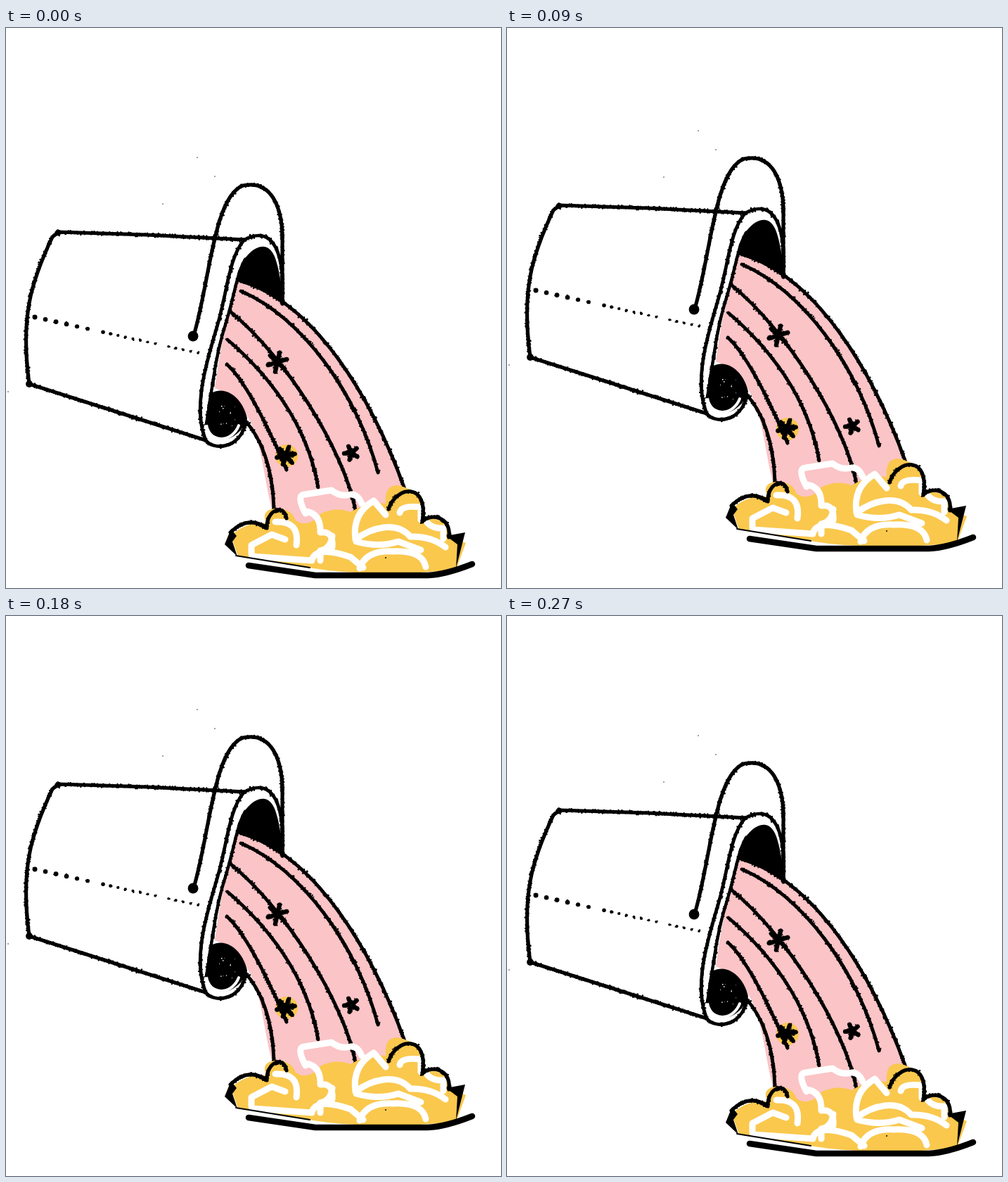
These frames come from a looping animation (704x796 px, 300 ms). An HTML page with a canvas:

```html
<!DOCTYPE html>
<html lang="en">
<head>
<meta charset="utf-8">
<title>Pouring bucket</title>
<style>
  html, body { margin: 0; width: 100%; height: 100%; overflow: hidden; background: #fff; }
  canvas { display: block; }
</style>
</head>
<body>
<canvas id="stage" width="704" height="796"></canvas>
<svg width="0" height="0"><path id="guide"/></svg>
<script>
const WIDTH = 704, HEIGHT = 796, STEP_MS = 30, STEPS = 10, PEAK_STEP = 5, PEAK = 63;
const INK = '#000', PAPER = '#fff', PINK = '#fbc4c6', YELLOW = '#fac84d';

const stage = document.getElementById('stage').getContext('2d');
const guide = document.getElementById('guide');
const art = document.createElement('canvas');
art.width = WIDTH;
art.height = HEIGHT;
const g = art.getContext('2d');

let seed = 17;
function random() {
  seed = (seed * 1664525 + 1013904223) % 4294967296;
  return seed / 4294967296;
}

function fill(path, color) {
  g.fillStyle = color;
  g.fill(new Path2D(path));
}

function line(path, color, width) {
  g.strokeStyle = color;
  g.lineWidth = width;
  g.stroke(new Path2D(path));
}

function dot(x, y, r, color = INK) {
  g.fillStyle = color;
  g.beginPath();
  g.arc(x, y, r, 0, Math.PI * 2);
  g.fill();
}

// Solid core with grainy edges.
function crayon(path, width = 6) {
  line(path, INK, width - 1.2);
  guide.setAttribute('d', path);
  const length = guide.getTotalLength(), spread = width - 0.8;
  for (let s = 0; s <= length; s += 0.8) {
    const { x, y } = guide.getPointAtLength(s);
    dot(x + (random() - 0.5) * spread, y + (random() - 0.5) * spread, 0.5 + random() * 0.9);
  }
}

const blob = (x, y, r) => crayon(`M${x},${y}h0.1`, r * 2);

function star(x, y, r, arms, turn) {
  for (let i = 0; i < arms; i++) {
    const a = turn + i / arms * Math.PI * 2;
    crayon(`M${x},${y}l${r * Math.cos(a)},${r * Math.sin(a)}`, 7.5);
  }
}

function drawStream() {
  const edge = 'M335,360 C440,392 520,525 567,655';
  fill(edge + 'V700 L420,712 L384,700 C360,640 372,540 297,512 Q306,440 328,360Z', PINK);
  dot(399, 608, 16, YELLOW);

  crayon(edge);
  crayon('M334,374 C420,410 500,520 529,632');
  crayon('M319,403 C400,470 480,600 497,685');
  crayon('M315,443 C370,490 428,560 444,653');
  crayon('M314,478 C345,505 385,595 399,628');
  crayon('M340,558 C360,580 380,620 381,688');

  star(386, 475, 14, 6, -0.3);
  star(398, 608, 13, 6, -0.2);
  star(491, 604, 10, 5, -0.7);
}

function drawRivets() {
  for (const [start, count, gap] of [[41, 6, 15], [138, 8, 10.6], [231, 5, 10.5]]) {
    for (let i = 0; i < count; i++) {
      const x = start + i * gap;
      blob(x, 411 + (x - 41) * 0.22, 3.9 - x / 130 + random() * 0.7);
    }
  }
}

function drawBucket() {
  // Dark inside, above and below the stream.
  fill('M327,360 C332,330 352,308 368,311 S388,340 396,394 Q368,370 327,360Z', INK);
  fill('M290,520 C315,505 338,530 343,555 C335,582 300,598 289,572 Q282,550 290,520Z', INK);
  for (let i = 0; i < 12; i++) dot(303 + random() * 24, 532 + random() * 34, 0.4 + random() * 0.5, PAPER);
  line('M287,571 C295,590 322,588 331,565', PAPER, 4);

  crayon('M284,586 L33,506 C20,410 36,360 66,297 L75,290 L200,294 L340,301', 6.4);
  blob(74, 291, 5);
  blob(33, 506, 5.5);

  // Rim, outside then inside.
  crayon('M393,392 C398,300 370,284 339,301 C317,325 315,375 300,425 S265,540 284,586 C294,600 332,600 341,561');
  crayon('M340,329 C328,350 325,380 311,425 S294,510 285,562', 5.5);

  // Handle.
  crayon('M267,437 C290,360 295,240 337,224 C375,216 395,250 393,310 V392', 6.4);
  blob(266, 438, 8);
  drawRivets();
}

function drawHeap() {
  fill(`M320,722 Q340,702 370,704 Q362,684 384,683 Q405,682 412,700 Q430,712 448,690
    Q470,680 490,688 Q515,672 540,676 Q538,650 556,650 Q594,656 594,696
    Q630,696 632,724 L654,732 L640,770 Q520,782 430,767 L330,751Z`, YELLOW);

  const curls = [
    'M426,690 Q412,664 425,663 L463,657 Q475,667 490,663 Q500,662 506,676',
    'M426,687 Q448,690 447,717 Q466,714 464,738',
    'M349,748 V735 L378,720 L397,727',
    'M383,702 Q418,700 413,735',
    'M350,751 L435,757 Q440,735 490,752 L508,767',
    'M464,722 Q462,740 447,743 V757',
    'M540,692 L523,672 Q492,690 497,727 C520,710 555,700 575,723 Q605,722 625,738',
    'M498,730 Q530,739 558,730 L590,742',
    'M503,768 Q512,742 550,744 Q592,742 597,766',
    'M560,689 Q562,678 590,681 V699',
    'M599,703 Q607,712 622,711 V726'
  ];
  for (const curl of curls) line(curl, PAPER, 9);

  crayon('M319,717 Q345,692 371,711 C370,685 395,675 399,697', 6.4);
  crayon('M544,684 C555,650 602,645 592,702 C600,690 634,692 630,724', 6.4);
  fill('M311,734 L320,712 L328,722 L322,730 L329,751Z', INK);
  fill('M626,722 L653,717 L640,768 L642,734Z', INK);
  line('M327,750 L432,767', INK, 2);
  line('M345,764 L440,778 H600 Q625,777 663,762', INK, 8.5);
  dot(540, 753, 1);
}

function drawArt() {
  g.lineCap = g.lineJoin = 'round';
  drawStream();
  drawBucket();
  drawHeap();
  for (const [x, y] of [[272, 184], [297, 211], [223, 250], [3, 517]]) dot(x, y, 0.7);
}

// Rises to the peak, then drops back slightly more slowly.
function lift(step) {
  const height = step <= PEAK_STEP ? step * PEAK / PEAK_STEP : PEAK - (step - PEAK_STEP) * 12.2;
  return Math.round(height);
}

function frame() {
  const step = Math.floor(performance.now() / STEP_MS) % STEPS;
  stage.fillStyle = PAPER;
  stage.fillRect(0, 0, WIDTH, HEIGHT);
  stage.drawImage(art, 0, -lift(step));
  requestAnimationFrame(frame);
}

drawArt();
frame();
</script>
</body>
</html>
```
